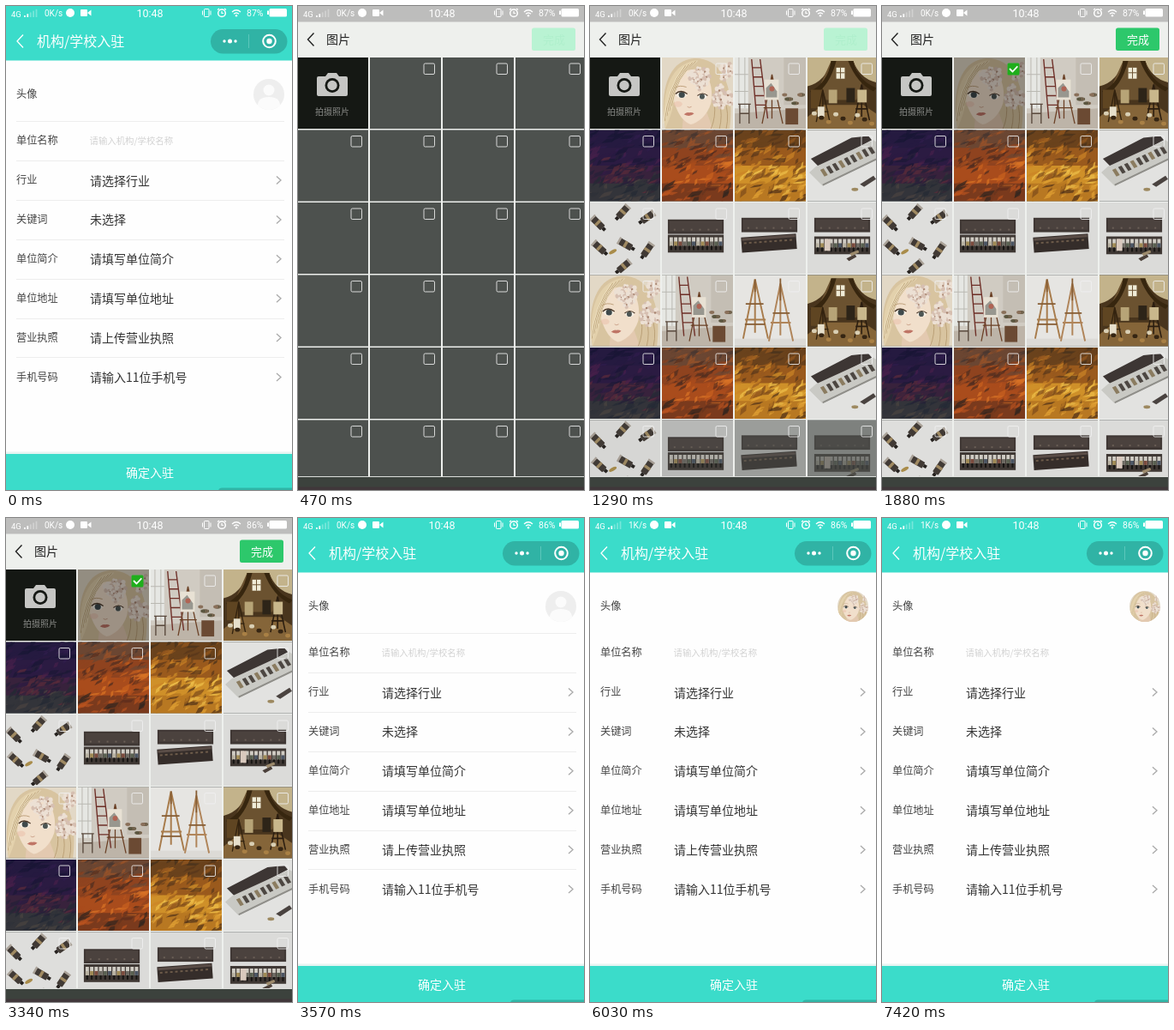
Write an HTML page that moves like this. It is 334 px wide and 564 px high and loops after 7.52 s.

```html
<!DOCTYPE html>
<html lang="zh-CN">
<head>
<meta charset="utf-8">
<title>机构入驻</title>
<style>
html, body { margin: 0; width: 100%; height: 100%; overflow: hidden; background: #fefefe; }
svg#stage { display: block; width: 100%; height: 100%; }
text { font-family: "Noto Sans CJK SC", "Noto Sans CJK", "Noto Sans", sans-serif; white-space: pre; }
.status text { font-family: Roboto, "Noto Sans", sans-serif; }
</style>
</head>
<body>
<svg id="stage" viewBox="0 0 334 564" preserveAspectRatio="none"></svg>
<script>
const LOOP = 7520, STEP = 117.5;
const OPEN = 470, PICK = 1520, DRAIN = 2350, CLOSE = 3450, SPEED = 4480, AVATAR = 4950;

// Markup helpers
const attrs = o => Object.entries(o).map(([k, v]) => ` ${k}="${v}"`).join('');
const rect = (x, y, width, height, fill, o = {}) => `<rect${attrs({ x, y, width, height, fill, ...o })}/>`;
const disc = (cx, cy, r, fill, o = {}) => `<circle${attrs({ cx, cy, r, fill, ...o })}/>`;
const oval = (cx, cy, rx, ry, fill, o = {}) => `<ellipse${attrs({ cx, cy, rx, ry, fill, ...o })}/>`;
const shape = (d, fill, o = {}) => `<path${attrs({ d, fill, ...o })}/>`;
const line = (d, stroke, w = 1, o = {}) => shape(d, 'none', { stroke, 'stroke-width': w, ...o });
const label = (s, x, y, size, fill, o = {}) => `<text${attrs({ x, y, 'font-size': size, fill, ...o })}>${s}</text>`;
const group = (s, o = {}) => `<g${attrs(o)}>${s}</g>`;
const list = (n, fn) => Array.from({ length: n }, (_, i) => fn(i)).join('');
const mid = { 'text-anchor': 'middle' };
const round = { 'stroke-linecap': 'round', 'stroke-linejoin': 'round' };

function seeded(s) {
  return () => (s = (s * 16807) % 2147483647) / 2147483647;
}

// Thumbnails, each on an 84 by 84 field
function sky(seed, bands) {
  const rnd = seeded(seed), n = bands.length;
  return bands.map((c, i) => rect(0, i * 84 / n, 84, 84 / n + 1, c[0])).join('') +
    list(170, () => {
      const x = rnd() * 84, y = rnd() * 84;
      const at = Math.max(0, Math.min(n - 1, Math.floor(y / 84 * n + (rnd() - .5) * 1.4)));
      const w = 2 + rnd() * 8, h = 1.5 + rnd() * 3;
      return shape(`M${x - w} ${y + h}L${x - w * .3} ${y - h * .6}L${x + w} ${y - h}L${x + w * .5} ${y + h * .4}Z`,
        bands[at][Math.floor(rnd() * 3)], { transform: `rotate(${-25 + rnd() * 35} ${x} ${y})`, opacity: .7 });
    });
}

function blossom(x, y, r) {
  return list(5, i => {
    const a = i * Math.PI * .4 + x;
    return disc(x + Math.cos(a) * r, y + Math.sin(a) * r, r * .75, i % 2 ? '#d6bfb1' : '#ece0d4');
  }) + disc(x, y, r * .35, '#a98672');
}

function girl() {
  const rnd = seeded(41);
  return rect(0, 0, 84, 84, '#e2d8c6') +
    shape('M4 84C-2 50 2 4 38 1C74 0 86 40 80 84Z', '#d8c4a0') +
    shape('M26 62L24 84L60 84L52 62Z', '#e3c9b0') +
    shape('M13 42C13 22 26 14 40 14C56 16 61 36 58 54C54 68 42 78 34 79C24 76 14 60 13 42Z', '#f1dfcb') +
    shape('M42 3C24 10 17 28 14 52C12 66 8 74 4 84C0 50 4 8 42 3Z', '#e3d1ac') +
    list(9, i => line(`M${42 - i * 2} ${4 + i * .8}Q${18 - i * 1.5} ${20 + i * 2} ${13 - i * 1.4} ${54 + i * 3}`, i % 2 ? '#b79c72' : '#f0e3c6', .8)) +
    line('M62 54Q64 70 58 84M68 54Q72 68 68 84M74 50Q80 66 76 84', '#b79c72', .9) +
    oval(23, 44, 6, 3.8, '#f6f0e6') + oval(23.5, 44, 3.6, 3.6, '#3f4a4c') +
    line('M16 43Q22 37 30 43', '#4a382a', 1.4) + line('M15 36Q21 32 29 35', '#b99a74', .9) +
    oval(48, 46, 5, 3.4, '#f6f0e6') + oval(47.5, 46, 3, 3.2, '#4d5654') + line('M42 45Q48 40 54 45', '#4a382a', 1.2) +
    line('M30 58Q32 60 35 58', '#c89d84', .9) + oval(19, 55, 5, 3.5, '#ebc3ad', { opacity: .6 }) +
    shape('M26 67Q30 64 32 65Q35 64 38 66Q33 71 26 67Z', '#bf7566') +
    list(30, () => {
      const x = 36 + rnd() * 46;
      return blossom(x, 10 + rnd() * (x > 54 ? 48 : 28), 2 + rnd() * 2);
    });
}

const easel = (x, y, h, c, w = 1.6) =>
  line(`M${x} ${y}L${x - h * .2} ${y + h}M${x} ${y}L${x + h * .22} ${y + h}M${x} ${y}V${y + h * .9}M${x - h * .17} ${y + h * .68}H${x + h * .18}`, c, w);

function studio() {
  return rect(0, 0, 84, 84, '#d0cbc2') + rect(0, 0, 16, 60, '#e6e7e3') +
    line('M5 0V60M12 0V60M0 20H16M0 40H16', '#b9b8b1') +
    rect(58, 0, 26, 56, '#c4beb4') + shape('M0 66L84 60V84H0Z', '#bdb4a8') +
    line('M20 2L26 72M30 2L39 72M21 12H31M22 23H33M23 34H34M24 45H36M25 56H37', '#6e2f27', 1.4) +
    easel(44, 20, 58, '#6b4126', 1.3) +
    rect(35, 26, 17, 24, '#e8e1d4') + shape('M37 47V36L43 30L50 40V47Z', '#98978f') + disc(44, 37, 3, '#b06454') +
    line('M4 55H19M6 55V78M17 55V78M6 66H17', '#5a4a3e', 1.4) +
    rect(60, 60, 15, 19, '#6b4a33') +
    list(14, i => oval(59 + (i * 7) % 22, 44 + (i * 5) % 15, 3, 2, i % 2 ? '#5b5640' : '#8a705a'));
}

function attic() {
  return rect(0, 0, 84, 84, '#49351d') +
    shape('M0 0H84V30Q62 26 54 4H28Q22 28 0 34Z', '#c3b38b') +
    shape('M28 4H54L64 30L58 50H22L16 30Z', '#6b5230') +
    shape('M28 4Q24 30 3 40L8 44Q26 34 34 4ZM54 4Q60 28 82 36L78 40Q58 30 48 4Z', '#37260f') +
    rect(34, 12, 10, 13, '#f0ecd8') + line('M39 12V25M34 18H44', '#6b5230') +
    shape('M0 70L18 56H66L84 68V84H0Z', '#856539') +
    rect(4, 38, 14, 22, '#5f4522') + rect(25, 38, 10, 16, '#b7a477') + rect(46, 36, 10, 17, '#2d2418') +
    easel(64, 32, 42, '#2c1e10', 1.6) + rect(59, 38, 11, 15, '#c9b78c') + easel(18, 38, 38, '#33230f', 1.4) +
    rect(12, 58, 8, 12, '#e6dfcb') +
    list(9, i => oval(8 + i * 8.5, 66 + (i * 5) % 14, 3, 2.4, ['#d9cfb4', '#352513', '#a98045'][i % 3]));
}

function easels() {
  return rect(0, 0, 84, 84, '#e6e5e2') + rect(0, 75, 84, 9, '#dcdad6') +
    easel(24, 5, 70, '#a87c4c', 2) + easel(54, 10, 68, '#b0855a', 2) +
    line('M13 34H34M12 58H36M45 45H65M24 5V20M54 4V30', '#865d34', 1.8);
}

function tray() {
  return rect(0, 0, 84, 84, '#e2e2e0') + shape('M4 34L52 9L72 7L76 12L14 44Z', '#3d3634') +
    shape('M2 50L10 43L78 12L84 16V34L18 66Z', '#c9c9c4') + line('M18 65L84 33', '#8f8e89', 2) +
    list(9, i => shape(`M${15 + i * 7} ${47 - i * 3.3}l4 -1.8l5 8l-4 1.8Z`, i % 3 ? '#4d4742' : '#8b7c60')) +
    shape('M62 64L78 54L81 58L67 67Z', '#4a4340') + oval(56, 70, 4, 2, '#9d8960');
}

function tubes() {
  const at = [[11, 25, -45], [39, 12, 42], [68, 18, 55], [13, 54, -48], [44, 50, -60], [68, 57, 35], [40, 76, 50]];
  return rect(0, 0, 84, 84, '#dededc') + at.map(([x, y, a]) => group(
    rect(-4, -9, 8, 16, '#413a35', { rx: 1 }) + rect(-4, -3, 8, 3.5, '#a08a62') + rect(-2, 7, 4, 4, '#26221f') +
    rect(-4.5, -11, 9, 2.5, '#aaa298'), { transform: `translate(${x} ${y}) rotate(${a})` })).join('') +
    oval(28, 58, 5, 2, '#a98c4a', { transform: 'rotate(-30 28 58)' });
}

const colours = ['#b9b2a2', '#a08a55', '#7c4c3e', '#6d6a62', '#5a6152', '#4b5563'];
function row(x, y) {
  return rect(x, y, 66, 21, '#3f3834') + list(12, i =>
    rect(x + 2 + i * 5.3, y + 3, 4, 10, '#cfcbc3') + rect(x + 2 + i * 5.3, y + 8, 4, 5, colours[i % 6]) +
    rect(x + 3 + i * 5.3, y + 13, 2, 5, '#171513'));
}
const lid = (x, y) => rect(x, y, 66, 17, '#3f3734') + rect(x + 2, y + 2, 62, 12, '#4b423e') +
  list(6, i => rect(x + 7 + i * 10, y + 11, 2, 2, '#6b5f57'));
const paper = rect(0, 0, 84, 84, '#dbdbd9');

const art = {
  girl: girl(), studio: studio(), attic: attic(), easels: easels(), tray: tray(), tubes: tubes(),
  dusk: sky(7, [['#251a40', '#2f1d4c', '#181634'], ['#2b1b42', '#47204a', '#1c1836'], ['#38223c', '#5c2b3a', '#242038'], ['#33343a', '#4a4440', '#242a34']]),
  blaze: sky(19, [['#6b4632', '#9a5228', '#473630'], ['#8f431f', '#c9611f', '#4d2c20'], ['#a94c1c', '#dc7526', '#5a2c1c'], ['#7a3a1d', '#b9531f', '#33251e']]),
  gold: sky(31, [['#6a421c', '#95581f', '#45301c'], ['#9a5a1d', '#cc8426', '#57361b'], ['#cf9029', '#efc04a', '#7d4a1a'], ['#b87822', '#e2a234', '#4f3018']]),
  set: paper + lid(7, 20) + row(7, 38),
  shut: paper + lid(8, 18) + group(rect(8, 39, 65, 18, '#352d2a') + rect(9, 40, 63, 3, '#5a4d47') +
    list(10, i => rect(11 + i * 6, 45, 3, 2, '#6d5b4a')), { transform: 'rotate(-4 40 48)' }),
  open: paper + lid(8, 18) + row(8, 40) + rect(20, 43, 7, 14, '#d9c9be') +
    shape('M46 66L56 61L58 64L49 69Z', '#4b403a') + shape('M50 60L60 56L61 59L52 63Z', '#9c8a6c')
};

// Status bar
const status = group(
  label('4G', 6, 13, 9.5, '#fff') +
  list(5, i => rect(21 + i * 3.4, 11 - i * 1.8, 1.8, 2 + i * 1.8, '#fff', { opacity: i < 2 ? .95 : .3 })) +
  label('0K/s', 45, 12, 10, '#fff', { id: 'speed' }) + disc(75, 8, 5, '#fff') +
  rect(87, 4, 8, 8, '#fff', { rx: 1 }) + shape('M95 8L99.5 4.5V11.5Z', '#fff') +
  label('10:48', 168, 12.5, 12.5, '#fff', mid) +
  rect(231.5, 3.5, 5.5, 9, 'none', { stroke: '#fff', rx: .8 }) + line('M229.5 5.5V10.5M239 5.5V10.5', '#fff') +
  disc(252, 8.3, 4.3, 'none', { stroke: '#fff', 'stroke-width': 1.5 }) +
  line('M252 6V8.5H254M247 4.5L249 3M257 4.5L255 3', '#fff', 1.2) +
  line('M264 7Q269 2.5 274 7M266 9.3Q269 6.6 272 9.3', '#fff', 1.3) + disc(269, 11.3, 1.2, '#fff') +
  label('87%', 281, 12, 10.5, '#fff', { id: 'power' }) +
  rect(307.5, 3, 20.5, 9.5, '#fff', { rx: 1.5 }) + rect(305, 5.5, 2, 4.5, '#fff'), { class: 'status' });

// Form page
const rows = [
  ['行业', '请选择行业'], ['关键词', '未选择'], ['单位简介', '请填写单位简介'],
  ['单位地址', '请填写单位地址'], ['营业执照', '请上传营业执照'], ['手机号码', '请输入11位手机号']
];
const teal = '#3bdcca', dark = '#444';
const form = rect(0, 0, 334, 564, '#fefefe') + rect(0, 0, 334, 63.5, teal) +
  line('M20 33.5L13 41L20 48.5', '#fff', 1.3) +
  label('机构/学校入驻', 36, 46.5, 16, '#fff', { 'font-weight': 300 }) +
  rect(239, 27, 89.5, 28.5, '#30b3a5', { rx: 14.25 }) +
  disc(255, 41, 1.7, '#fff') + disc(261.5, 41, 2.5, '#fff') + disc(268, 41, 1.7, '#fff') +
  line('M283.5 33V49', '#5cc7bb') +
  disc(307.5, 41, 7.3, 'none', { stroke: '#fff', 'stroke-width': 2 }) + disc(307.5, 41, 3.2, '#fff') +
  label('头像', 12, 106.5, 12.2, dark) + label('单位名称', 12, 161, 12.2, dark) +
  label('请输入机构/学校名称', 97.5, 160.5, 10.4, '#d2d2d2', { 'font-weight': 300 }) +
  rows.map(([a, b], i) => {
    const y = 203 + i * 45.9;
    return label(a, 12, y + 4, 12.2, dark) + label(b, 98, y + 5.5, 14, '#333') +
      line(`M316 ${y - 4.5}L321 ${y}L316 ${y + 4.5}`, '#aaa', 1.3);
  }).join('') +
  group(list(7, i => rect(12, Math.round(134 + i * 45.9), 313, 1, '#ededed')), { id: 'rules' }) +
  group(disc(307, 103, 18, '#eee') + disc(307, 98, 6.5, '#fbfbfb') +
    shape('M294 116Q294 106 307 106Q320 106 320 116Q314 121 307 121Q300 121 294 116Z', '#fbfbfb'), { id: 'blank' }) +
  '<svg id="face" x="289" y="85" width="36" height="36" viewBox="0 0 84 84"><g clip-path="url(#ring)"><use href="#girl" width="84" height="84"/></g></svg>' +
  rect(0, 519.5, 334, 2.5, '#e6f4f2') + rect(0, 522, 334, 42, teal) +
  label('确定入驻', 168, 549, 14, '#fff', mid) + rect(248, 561.5, 90, 8, '#2fb5a6', { rx: 4 });

// Picture page
const order = ['girl', 'studio', 'attic', 'dusk', 'blaze', 'gold', 'tray', 'tubes', 'set', 'shut', 'open',
  'girl', 'studio', 'easels', 'attic', 'dusk', 'blaze', 'gold', 'tray', 'tubes', 'set', 'shut', 'open'];
const SIDE = 83;
const tileX = i => (i % 4) * 85 - 1, tileY = i => 60 + Math.floor(i / 4) * 84.5;
const tiles = order.map((name, k) => {
  const x = tileX(k + 1), y = tileY(k + 1);
  return rect(x, y, SIDE, SIDE, '#4d514e') +
    `<use class="pic" href="#${name}" x="${x}" y="${y}" width="${SIDE}" height="${SIDE}"/>` +
    rect(x + 63, y + 7, 12.5, 12.5, 'none', { rx: 1.5, stroke: '#f0f0f0', opacity: .85 });
}).join('');

const camera = rect(0, 60, 82, SIDE, '#151814') +
  shape('M24 82H32L35 78H45L48 82H56Q58 82 58 84V103Q58 105 56 105H24Q22 105 22 103V84Q22 82 24 82Z', '#c6c6c4') +
  disc(40, 92.5, 8.5, '#151814') + disc(40, 92.5, 5.7, '#c6c6c4') +
  label('拍摄照片', 40, 127, 10, '#8b8c89', mid);

const gallery = rect(0, 0, 334, 564, '#eef0ed') + rect(0, 0, 334, 18.5, '#bdbdbc') +
  line('M18.5 31.5L11.5 39L18.5 46.5', '#222', 1.4) +
  label('图片', 33, 43.5, 14, '#222', { 'font-weight': 500 }) +
  rect(273, 25.5, 51, 26.5, '#b9f3d3', { rx: 2.5, id: 'button' }) +
  label('完成', 299, 43.5, 13, '#afefcc', { ...mid, id: 'done' }) +
  camera + tiles +
  group(rect(84, 60, SIDE, SIDE, '#000', { opacity: .35 }) + rect(146.5, 66.5, 14, 14, '#1fae1c', { rx: 1.5 }) +
    line('M149.5 73.5L152.5 76.5L157.8 70.8', '#fff', 1.8, round), { id: 'mark' }) +
  rect(0, 548, 334, 1, '#dcdedb') + rect(0, 549, 334, 15, '#3c423d') + rect(0, 560.5, 334, 4, '#40373a');

document.getElementById('stage').innerHTML =
  '<defs><clipPath id="ring"><circle cx="42" cy="42" r="42"/></clipPath>' +
  Object.entries(art).map(([id, s]) => `<symbol id="${id}" viewBox="0 0 84 84">${s}</symbol>`).join('') + '</defs>' +
  group(form, { id: 'form' }) + group(gallery, { id: 'gallery' }) + status;

const $ = id => document.getElementById(id);
const pics = [...document.querySelectorAll('.pic')];
const show = (id, on) => { $(id).style.display = on ? '' : 'none'; };

function draw(t) {
  const browsing = t >= OPEN && t < CLOSE, picked = t >= PICK, filled = t >= AVATAR;
  show('form', !browsing);
  show('gallery', browsing);
  show('mark', picked);
  show('rules', !filled);
  show('blank', !filled);
  show('face', filled);
  $('button').setAttribute('fill', picked ? '#2dc86b' : '#b9f3d3');
  $('done').setAttribute('fill', picked ? '#fff' : '#afefcc');
  $('power').textContent = t < DRAIN ? '87%' : '86%';
  $('speed').textContent = t < SPEED ? '0K/s' : '1K/s';
  // Pictures fade in one after another, in even ticks
  const tick = Math.floor((t + 5) / STEP) * STEP;
  pics.forEach((p, i) => {
    p.style.opacity = Math.max(0, Math.min(1, (tick - 675 - i * 26) / 130));
  });
}

const start = performance.now();
function frame() {
  draw((performance.now() - start) % LOOP);
  requestAnimationFrame(frame);
}
frame();
</script>
</body>
</html>
```
